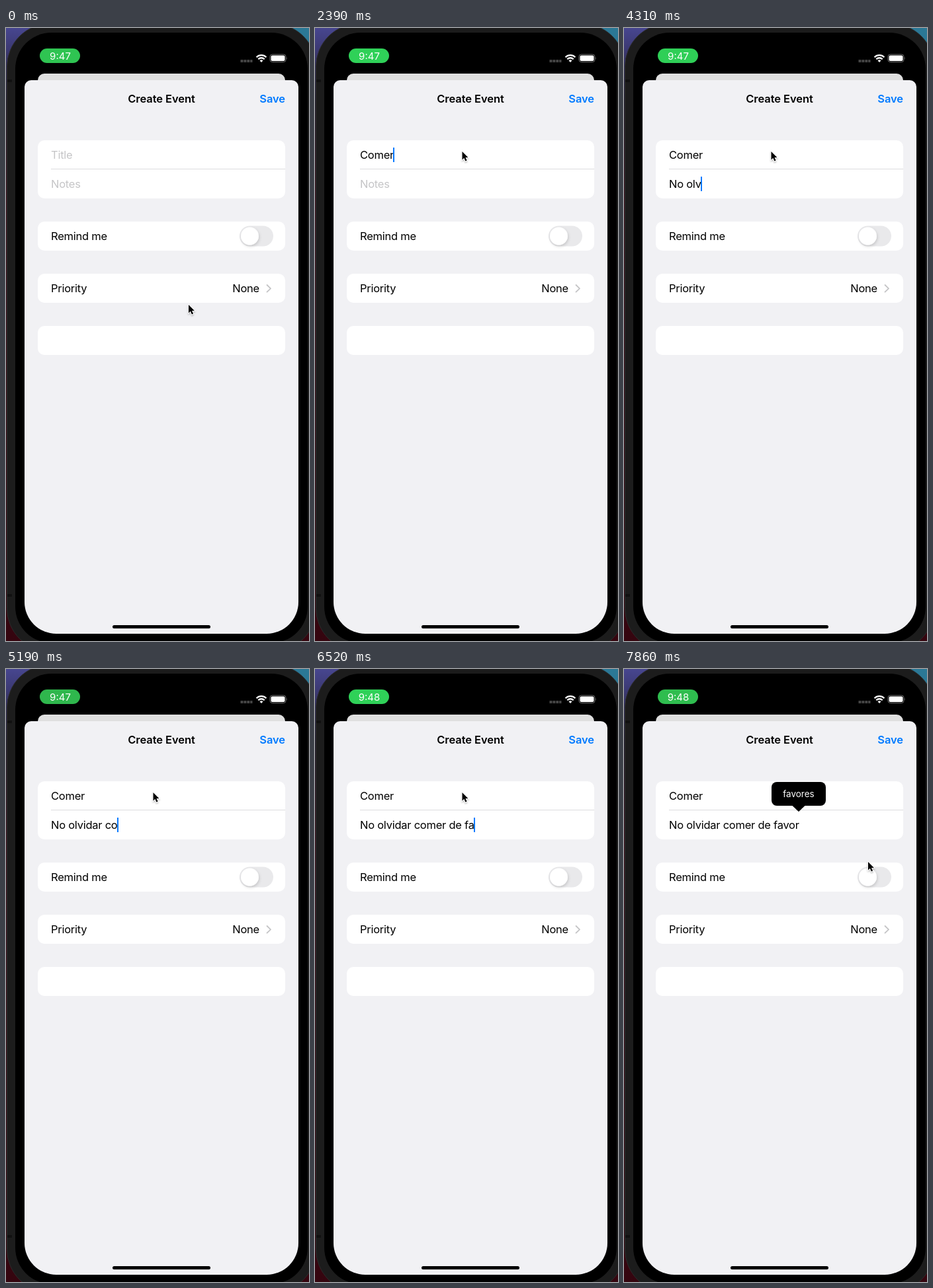
An HTML page that plays this animation: 458x928 px, repeating every 8 s.

```html
<!DOCTYPE html>
<html lang="en">
<head>
<meta charset="utf-8">
<title>Create Event</title>
<style>
  html, body { margin: 0; width: 100%; height: 100%; overflow: hidden; background: #000; }
  svg { display: block; width: 458px; height: 928px; }
  text { font: 16.5px Inter, sans-serif; letter-spacing: -.25px; white-space: pre; fill: #000; }
  .bold { font-weight: 600; letter-spacing: -.08px; }
  .hint { fill: #c5c5c7; }
  .end { text-anchor: end; }
  .mid { text-anchor: middle; }
  .card { fill: #fff; }
</style>
</head>
<body>
<svg viewBox="0 0 458 928">
  <defs>
    <linearGradient id="wall" x2="0" y2="1">
      <stop offset="0" stop-color="#47468f"/>
      <stop offset=".12" stop-color="#201a2c"/>
      <stop offset=".28" stop-color="#3f0f1e"/>
      <stop offset="1" stop-color="#35050f"/>
    </linearGradient>
    <filter id="soft" x="-50%" y="-50%" width="200%" height="200%">
      <feDropShadow dx="0" dy="1.5" stdDeviation="1.2" flood-opacity=".3"/>
    </filter>
    <filter id="knobShadow" x="-50%" y="-50%" width="200%" height="200%">
      <feDropShadow dx="1" dy="2" stdDeviation="2" flood-opacity=".16"/>
    </filter>
  </defs>

  <!-- wallpaper and phone body -->
  <rect width="458" height="928" fill="url(#wall)"/>
  <rect x="400" width="58" height="60" fill="#2b7896"/>
  <rect x="1.5" y="-6.5" width="467" height="950" rx="65" fill="#1c1c1c" stroke="#2c2c2c"/>
  <path d="M2 80h7M2 859h7" stroke="#111" stroke-width="4"/>
  <rect x="14" y="7" width="442" height="924" rx="55"/>

  <!-- status bar -->
  <rect id="pill" x="51" y="31" width="61" height="22" rx="11"/>
  <text id="clock" class="mid" x="82" y="47.5" style="font-size:15px;letter-spacing:0;fill:#fff"></text>
  <path d="M354.5 50h18" stroke="#454545" stroke-width="4" stroke-dasharray="4 .9"/>
  <g fill="none" stroke="#fff" stroke-width="2.3">
    <path d="M378.6 44.2a10.4 10.4 0 0 1 14.8 0M381.3 47.2a6.6 6.6 0 0 1 9.4 0"/>
    <path d="M383.5 49.2q2.5-2 5 0L386 52z" fill="#fff" stroke="none"/>
  </g>
  <rect x="399" y="40" width="24" height="11.5" rx="3.4" fill="none" stroke="#707070"/>
  <rect x="400.5" y="41.5" width="21" height="8.5" rx="2" fill="#fff"/>
  <path d="M424.3 44q1.4 1.7 0 3.6z" fill="#777"/>

  <!-- sheet -->
  <rect x="48" y="69" width="374" height="30" rx="10" fill="#dfdfdf"/>
  <path d="M28 89a10 10 0 0 1 10-10h394a10 10 0 0 1 10 10v780a48 48 0 0 1-48 48H76a48 48 0 0 1-48-48z" fill="#f1f1f4"/>
  <text class="bold mid" x="235" y="113">Create Event</text>
  <text class="bold end" x="422" y="113" style="fill:#007aff">Save</text>
  <g class="card">
    <rect x="48" y="170" width="374" height="88" rx="10"/>
    <rect x="48" y="293" width="374" height="44" rx="10"/>
    <rect x="48" y="372" width="374" height="44" rx="10"/>
    <rect x="48" y="451" width="374" height="44" rx="10"/>
  </g>
  <path d="M68 213.5h354" stroke="#dcdcde"/>
  <text id="title" x="68" y="198"></text>
  <text id="notes" x="68" y="242"></text>
  <rect id="caret" width="2" height="22" fill="#0a7aff"/>
  <text x="68" y="321">Remind me</text>
  <rect x="353" y="299.5" width="51" height="31" rx="15.5" fill="#e9e9eb"/>
  <circle cx="368.5" cy="315" r="13.5" fill="#fff" filter="url(#knobShadow)"/>
  <text x="68" y="400">Priority</text>
  <text class="end" x="383" y="400">None</text>
  <path d="M394.5 389l5.5 5.3-5.5 5.3" fill="none" stroke="#c4c4c6" stroke-width="1.8" stroke-linecap="round" stroke-linejoin="round"/>
  <rect x="161" y="904" width="148" height="5" rx="2.5"/>

  <g id="popup">
    <rect x="223" y="171" width="82" height="36" rx="8"/>
    <path d="M254 206.5h20l-10 9.5z"/>
    <text class="mid" x="264" y="194" style="font-size:13.5px;letter-spacing:0;fill:#fff">favores</text>
  </g>
  <path id="pointer" d="M0 0v12.4l2.8-2.6 2.1 4.8 2.2-1-2.1-4.6h3.9z" stroke="#fff" stroke-width="1.6" paint-order="stroke" filter="url(#soft)"/>
</svg>
<script>
const LOOP = 8000;
const TICK = 148.1; // the screen refreshes once per tick; all times below are in ticks
const TITLE_FOCUS = 8, NOTES_FOCUS = 18, NEW_MINUTE = 39, BLUR = 50;
const el = Object.fromEntries([...document.querySelectorAll('[id]')].map(e => [e.id, e]));

const fields = {
  title: { hint: 'Title', caretY: 181, bursts: [['Com', 12, 13], ['er', 15, 16]] },
  notes: {
    hint: 'Notes', caretY: 225,
    bursts: [['No ', 22, 24], ['olvidar ', 27, 32], ['comer de f', 34, 42], ['avor ', 44, 48]],
  },
};
const moves = [
  { from: 0, to: 1, dx: -6, dy: -36 },
  { from: 2, to: 6, dx: -47.5, dy: -196 },
  { from: BLUR, to: 53, dx: 146.5, dy: 105 },
];

const progress = (tick, from, to) => Math.min(1, Math.max(0, (tick - from) / (to - from)));
const ease = p => p * p * (3 - 2 * p);

// The first letter lands at `from`, the last at `to`, the others evenly between.
const typed = (tick, [text, from, to]) => tick < from ? ''
  : text.slice(0, 1 + Math.floor((text.length - 1) * progress(tick, from, to)));

function pointerAt(tick) {
  let x = 276, y = 419;
  for (const { from, to, dx, dy } of moves) {
    const p = ease(progress(tick, from, to));
    x += dx * p;
    y += dy * p;
  }
  return [x, y];
}

function draw(now) {
  const tick = Math.floor(now % LOOP / TICK);
  const focused = tick < TITLE_FOCUS || tick >= BLUR ? null : tick < NOTES_FOCUS ? 'title' : 'notes';
  el.caret.style.display = focused ? '' : 'none';

  for (const [name, { hint, caretY, bursts }] of Object.entries(fields)) {
    const text = bursts.map(burst => typed(tick, burst)).join('');
    el[name].textContent = text || hint;
    el[name].classList.toggle('hint', !text);
    if (name === focused) {
      const width = text ? el[name].getComputedTextLength() : 1;
      el.caret.setAttribute('x', Math.round(67 + width));
      el.caret.setAttribute('y', caretY);
    }
  }

  // The status pill pulses every two seconds.
  const green = 193.5 + 15.5 * Math.cos((tick * TICK - 2440) * Math.PI / 1000);
  el.pill.setAttribute('fill', `rgb(47 ${Math.round(green)} ${Math.round(green * .42)})`);
  el.clock.textContent = tick < NEW_MINUTE ? '9:47' : '9:48';
  el.popup.style.display = tick < BLUR ? 'none' : '';
  el.pointer.setAttribute('transform', `translate(${pointerAt(tick)})`);
  requestAnimationFrame(() => draw(performance.now()));
}
draw(0);
</script>
</body>
</html>
```
